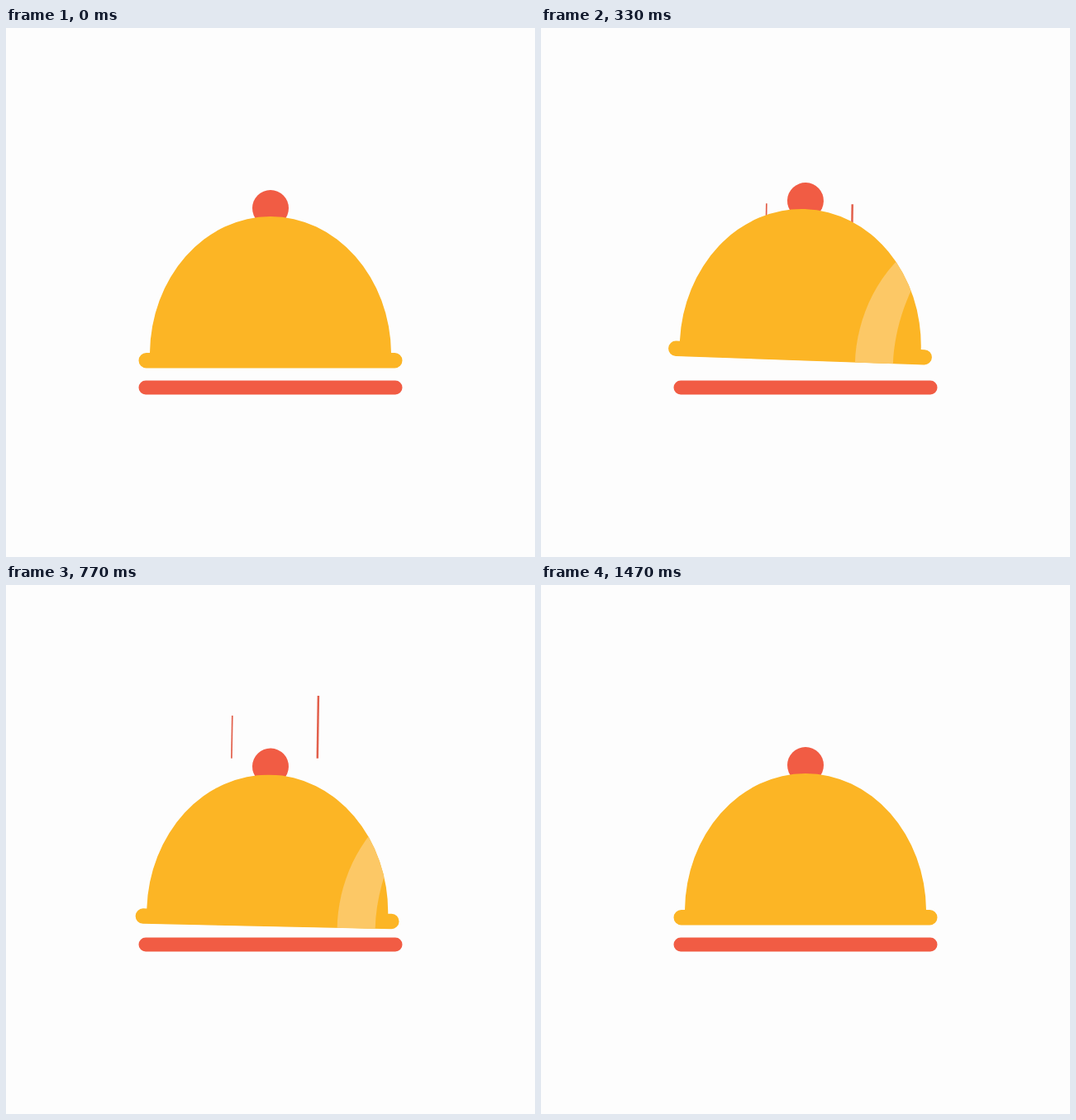
These frames come from a looping animation (640 px wide and 640 px high, 1510 ms). An HTML page:

```html
<!DOCTYPE html>
<html lang="en">
<head>
<meta charset="utf-8">
<title>Serving dome</title>
<style>
  html, body { margin: 0; width: 100%; height: 100%; overflow: hidden; background: #fdfdfd; }
  svg { display: block; width: 100%; height: 100%; }
</style>
</head>
<body>
<svg viewBox="0 0 640 640">
  <defs>
    <clipPath id="shell">
      <path d="M174 398V395A146 167 0 0 1 466 395V398Z"/>
      <rect x="160.5" y="393" width="319" height="18.4" rx="9.2"/>
    </clipPath>
  </defs>
  <rect x="160.5" y="426.5" width="319" height="17" rx="8.5" fill="#f15c44"/>
  <g fill="none" stroke="#e2604c">
    <path id="steamL" stroke-width="1.7"/>
    <path id="steamR" stroke-width="2.5"/>
  </g>
  <g id="lid">
    <circle cx="320" cy="218" r="22" fill="#f15c44"/>
    <g clip-path="url(#shell)">
      <rect x="150" y="220" width="340" height="200" fill="#fcb525"/>
      <path id="shine" fill="#fcc866" d="M0 412C0 340 40 258 140 229L146 228C82 261 46 343 46 412Z"/>
    </g>
  </g>
</svg>
<script>
  const LOOP = 1510;
  const FPS = 30;
  const el = id => document.getElementById(id);
  const lid = el('lid'), shine = el('shine');

  // [time, value] keys, eased between neighbours
  const TILT = [[0, 0], [250, 1.95], [430, 2.1], [583, -1.4], [735, 1.35], [890, 0]];
  const LIFT = [[0, 0], [250, -9], [430, -9], [760, 1.6], [920, 0]];
  const SWEEP = [[0, 105], [510, 490], [661, 490], [1000, 105]];

  const STEAM = [
    { path: el('steamL'), x0: 272.6, x1: 273.8, base: 227, rise: 69 },
    { path: el('steamR'), x0: 376.4, x1: 377.9, base: 235, rise: 101 }
  ];

  const ease = p => (1 - Math.cos(Math.PI * p)) / 2;
  const ramp = (t, start, span, power) =>
    Math.pow(Math.min(1, Math.max(0, (t - start) / span)), power);

  function at(keys, t) {
    for (let i = 1; i < keys.length; i++) {
      const [t0, a] = keys[i - 1], [t1, b] = keys[i];
      if (t < t1) return a + (b - a) * ease((t - t0) / (t1 - t0));
    }
    return keys[keys.length - 1][1];
  }

  function draw(t) {
    lid.setAttribute('transform',
      `translate(0 ${at(LIFT, t)}) rotate(${at(TILT, t)} 320 217)`);
    shine.setAttribute('transform', `translate(${at(SWEEP, t)} 0)`);

    const head = ramp(t, 0, 748, 1.9);
    const tail = ramp(t, 390, 730, 2.1);
    for (const s of STEAM) {
      const point = p => `${s.x0 + (s.x1 - s.x0) * p} ${s.base - s.rise * p}`;
      s.path.setAttribute('d', head > tail ? `M${point(tail)}L${point(head)}` : '');
    }
  }

  // hold each pose for one step; the 4 ms allow for times rounded to 10 ms
  const step = t => Math.floor((t + 4) * FPS / 1000) * 1000 / FPS;

  const start = performance.now();
  function tick() {
    draw(step((performance.now() - start) % LOOP));
    requestAnimationFrame(tick);
  }
  draw(0);
  requestAnimationFrame(tick);
</script>
</body>
</html>
```
